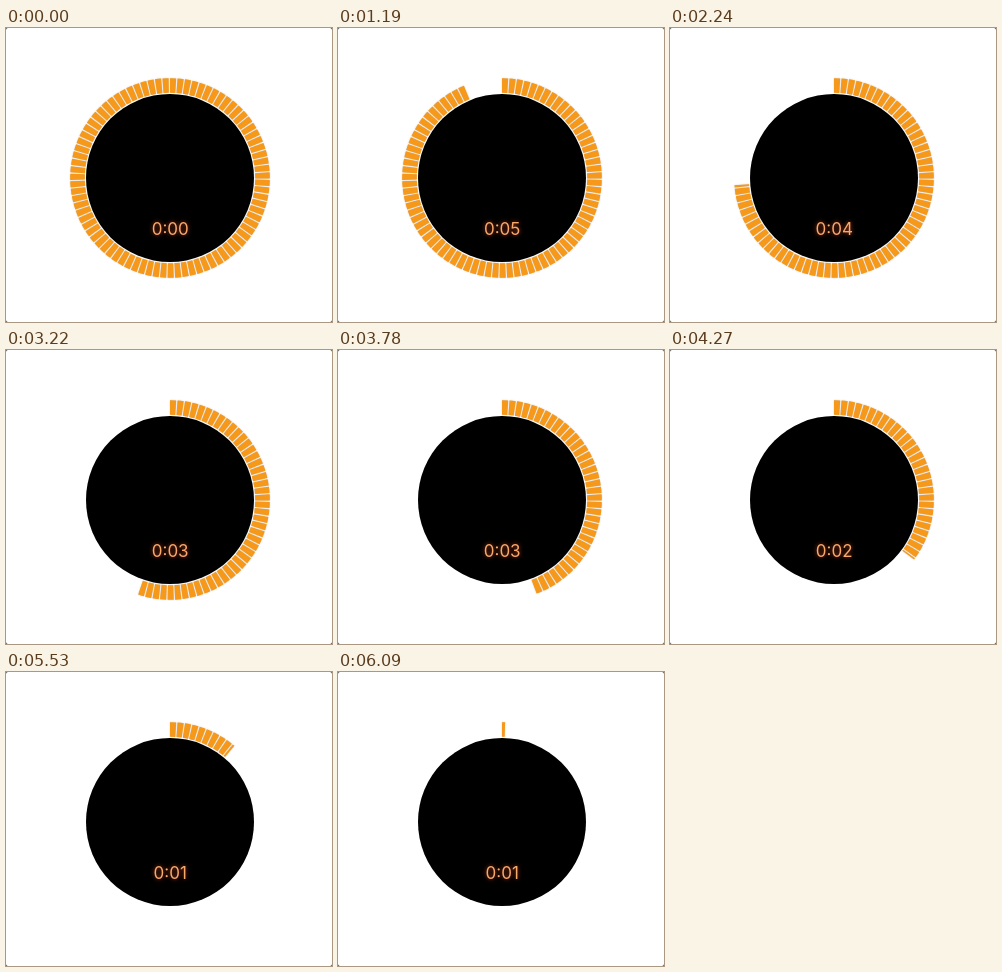
Animation, 326 px wide and 294 px high, one loop 6.16 s. Source, as an HTML page with a canvas:

```html
<!DOCTYPE html>
<html lang="en">
<head>
<meta charset="utf-8">
<title>Countdown ring</title>
<style>
  html, body { margin: 0; width: 100%; height: 100%; overflow: hidden; background: #fff; }
  canvas { display: block; width: 326px; height: 294px; }
</style>
</head>
<body>
<canvas id="stage" width="326" height="294"></canvas>
<script>
const W = 326, H = 294, CX = 164, CY = 150;
const LOOP = 6160, STEP = 70;
const START = 866, SECOND = 1050, TOTAL = 5;
const TICKS = 83, RADIUS = 92.5, THICK = 14.6, FILL = 0.82;
const TAU = Math.PI * 2;
const ctx = document.getElementById('stage').getContext('2d');

function drawBackdrop() {
  ctx.fillStyle = '#333';
  ctx.fillRect(0, 0, W, H);
  ctx.fillStyle = '#fff';
  ctx.beginPath();
  ctx.roundRect(0, 0, W, H, 2);
  ctx.fill();
}

// Dashes run clockwise from the top; the last one is cut at the end angle.
function drawRing(part) {
  const end = part * TAU, pitch = TAU / TICKS;
  ctx.save();
  ctx.strokeStyle = '#f6981a';
  ctx.lineWidth = THICK;
  ctx.shadowColor = 'rgba(130, 115, 95, 0.45)';
  ctx.shadowBlur = 1.5;
  ctx.beginPath();
  for (let a = 0; a < end - 1e-6; a += pitch) {
    const from = a - TAU / 4;
    const to = Math.min(a + pitch * FILL, end) - TAU / 4;
    ctx.moveTo(CX + RADIUS * Math.cos(from), CY + RADIUS * Math.sin(from));
    ctx.arc(CX, CY, RADIUS, from, to);
  }
  ctx.stroke();
  ctx.restore();
}

function drawDial() {
  ctx.fillStyle = '#000';
  ctx.beginPath();
  ctx.arc(CX, CY, 84, 0, TAU);
  ctx.fill();
}

function drawTime(seconds) {
  ctx.save();
  ctx.font = '17px Inter, Roboto, sans-serif';
  ctx.textAlign = 'center';
  ctx.fillStyle = '#f8aa6c';
  ctx.shadowColor = '#b8401c';
  ctx.shadowBlur = 4;
  ctx.fillText('0:0' + seconds, CX + 0.2, 206.5);
  ctx.restore();
}

function draw(now) {
  const t = Math.floor((now % LOOP) / STEP) * STEP;
  const left = TOTAL - (t - START) / SECOND;
  const running = t >= START;
  drawBackdrop();
  drawRing(Math.max(0, Math.min(1, left / TOTAL)));
  drawDial();
  drawTime(running ? Math.max(0, Math.ceil(left)) : 0);
}

const origin = performance.now();
function tick() {
  draw(performance.now() - origin);
  requestAnimationFrame(tick);
}
tick();
</script>
</body>
</html>
```
